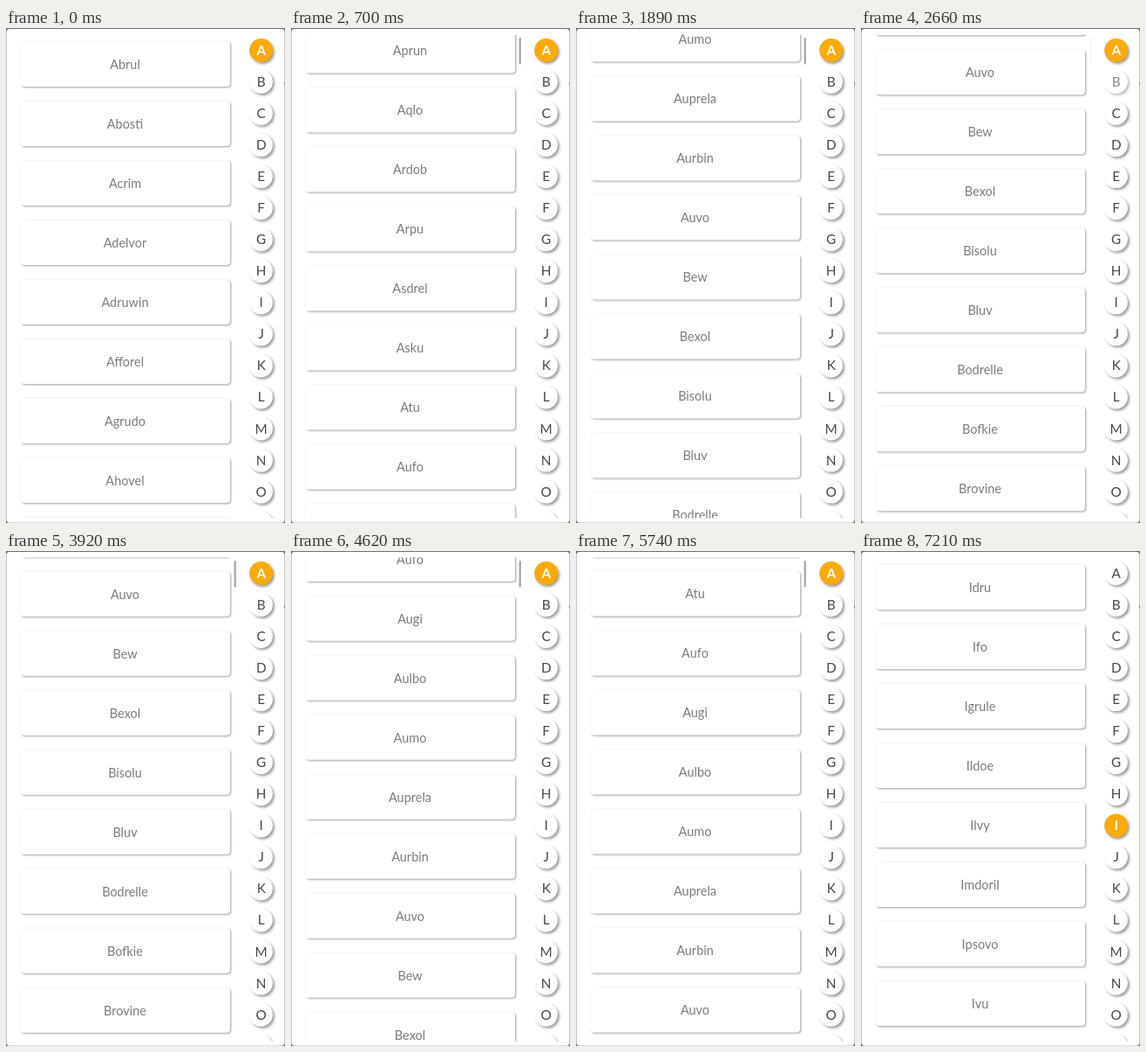
Recreate the animation shown at these times as an HTML page. Size 320x566 px, loop 8000 ms.

```html
<!DOCTYPE html>
<html lang="en">
<head>
<meta charset="utf-8">
<title>Name list</title>
<style>
  html, body { margin: 0; width: 100%; height: 100%; overflow: hidden; background: #fff; }
  svg { display: block; width: 100vw; height: 100vh; }
  text { font-family: Lato, "Open Sans", sans-serif; text-anchor: middle; }
  .card { fill: #fff; filter: drop-shadow(1px 1.6px 1.1px rgba(0, 0, 0, .38)); }
  .name { font-size: 14.5px; fill: #7c7c7c; }
  .dot { fill: #fff; filter: drop-shadow(2px 2.1px 1.8px rgba(0, 0, 0, .4)); }
  .letter { font-size: 15.3px; fill: #484848; }
  .active .dot { fill: #fcab0a; }
  .active .letter { fill: #fff; font-weight: 700; }
</style>
</head>
<body>
<svg id="stage" viewBox="0 0 320 566" preserveAspectRatio="none">
  <clipPath id="window"><rect y="7.5" width="320" height="553"/></clipPath>
  <rect width="320" height="566" fill="#727272"/>
  <rect x=".4" y="1" width="319.2" height="564.8" rx="4" fill="#fff"/>
  <rect x="319" y="62" width="1" height="3" fill="#888"/>
  <g clip-path="url(#window)">
    <g id="list"></g>
    <rect id="bar" x="261.6" y="11" width="2.2" height="30.5" rx="1.1" fill="#a3a3a3"/>
    <g id="index"></g>
  </g>
</svg>
<script>
const LOOP = 8000, PITCH = 68, SLOTS = 10;
const people = (
  "Abrul Abosti Acrim Adelvor Adruwin Afforel Agrudo Ahovel " +
  "Aksurin Alquor Alvoth Amdulin Amperil Andovu Anvoly Apdrena " +
  "Aprun Aqlo Ardob Arpu Asdrel Asku Atu Aufo Augi Aulbo Aumo Auprela Aurbin Auvo " +
  "Bew Bexol Bisolu Bluv Bodrelle Bofkie Brovine Brulda Buvane").split(" ");
const others = "Idru Ifo Igrule Ildoe Ilvy Imdoril Ipsovo Ivu".split(" ");
const sectionB = people.indexOf("Bew") * PITCH;

function add(parent, tag, attrs, text = "") {
  const node = document.createElementNS("http://www.w3.org/2000/svg", tag);
  for (const key in attrs) node.setAttribute(key, attrs[key]);
  node.textContent = text;
  return parent.appendChild(node);
}

const byId = id => document.getElementById(id);
const bar = byId("bar");

const rows = Array.from({ length: SLOTS }, () => {
  const group = add(byId("list"), "g", {});
  add(group, "rect", { class: "card", x: 17, y: 15.5, width: 240, height: 51.5, rx: 4 });
  return { group, label: add(group, "text", { class: "name", x: 136.5, y: 47 }) };
});

const letters = [..."ABCDEFGHIJKLMNOP"].map((char, i) => {
  const y = 25.5 + 36.05 * i;
  const group = add(byId("index"), "g", {});
  add(group, "circle", { class: "dot", cx: 292.5, cy: y, r: 13.4 });
  add(group, "text", { class: "letter", x: 292.7, y: y + 5.4 }, char);
  return group;
});

const progress = (t, start, length) => Math.min(1, Math.max(0, (t - start) / length));
const smooth = u => u * u * (3 - 2 * u);
const mix = (a, b, u) => a + (b - a) * u;

// Momentum scrolling loses speed exponentially after the flick.
const flick = (t, start, distance) => distance * (1 - Math.exp(-Math.max(0, t - start) / 500));
const flickDown = t => flick(t, 254, 1867.3);
const flickUp = t => sectionB - flick(t, 3849, 564.3);

function jumpToB(t, start, momentum) {
  return mix(momentum(Math.min(t, start)), sectionB, smooth(progress(t, start, 330)));
}

function scrollAt(t) {
  if (t < 3845) return jumpToB(t, 2473, flickDown);
  if (t < 6505) return jumpToB(t, 5860, flickUp);
  return 0;
}

function activeAt(t) {
  if (t < 2835) return 0;
  if (t < 3900) return 1;
  if (t < 6215) return 0;
  return t < 6365 ? 1 : 8;
}

function barAt(t) {
  if (t < 254) return 0;
  if (t < 3845) return 1 - progress(t, 2425, 260);
  return 1 - progress(t, 5815, 260);
}

function pressAt(t, down) {
  const up = down + 137;
  return t < up
    ? mix(1, .2, smooth(progress(t, down, 137)))
    : mix(.2, 1, smooth(progress(t, up, 250)));
}

function draw(t) {
  const names = t < 6505 ? people : others;
  const scroll = scrollAt(t);
  const first = Math.floor(scroll / PITCH);
  rows.forEach(({ group, label }, i) => {
    const name = names[first + i];
    group.setAttribute("display", name ? "inline" : "none");
    group.setAttribute("transform", `translate(0 ${(first + i) * PITCH - scroll})`);
    label.textContent = name || "";
  });
  bar.setAttribute("opacity", barAt(t));
  const active = activeAt(t);
  letters.forEach((group, i) => group.setAttribute("class", i === active ? "active" : ""));
  letters[1].setAttribute("opacity", pressAt(t, t < 4000 ? 2390 : 5777));
}

function tick() {
  draw(performance.now() % LOOP);
  requestAnimationFrame(tick);
}
tick();
</script>
</body>
</html>
```
